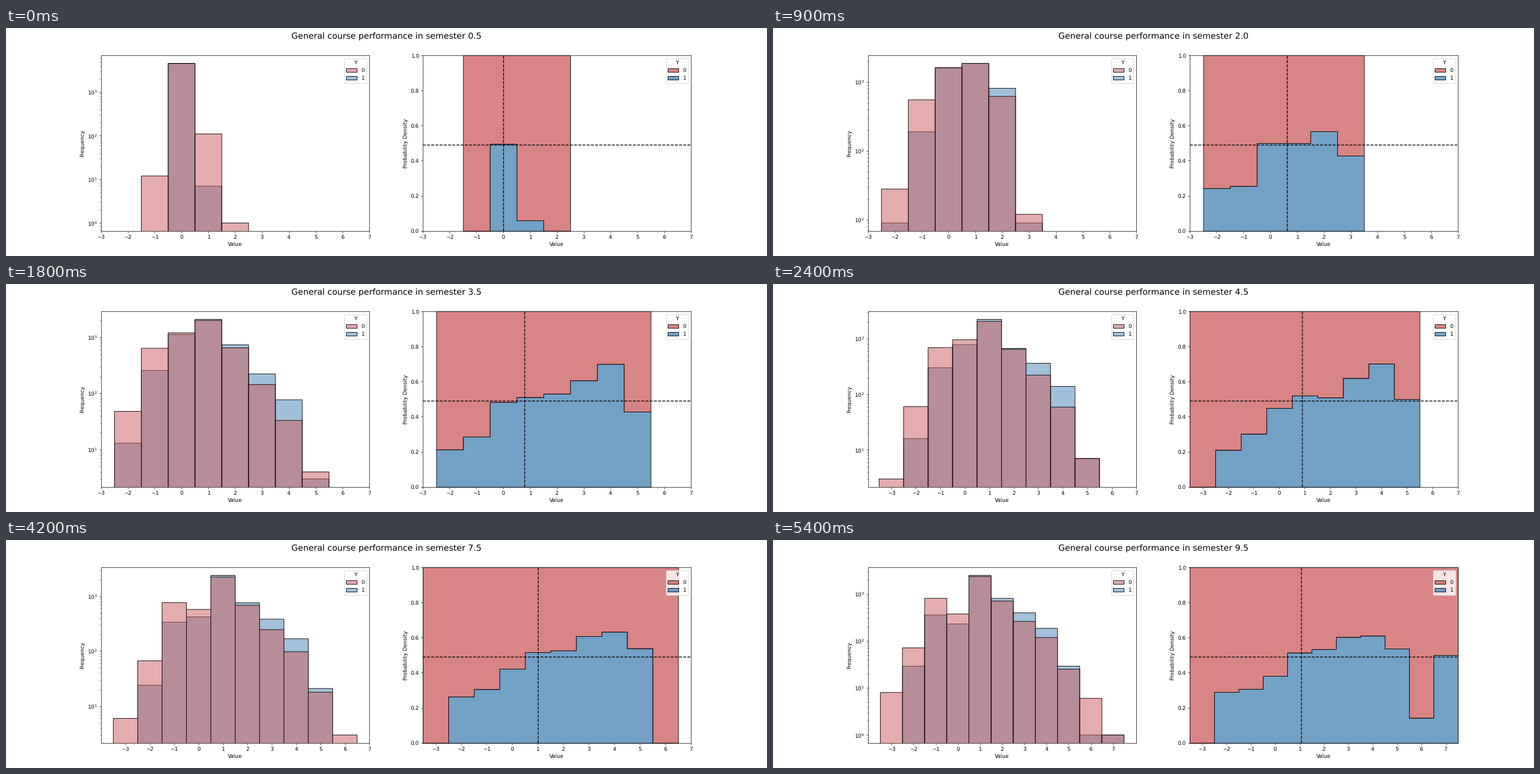
Recreate the animation shown at these times as a matplotlib script. Size 1280 px wide and 384 px high, loop 5700 ms.

```python
import matplotlib.pyplot as plt
import numpy as np
from matplotlib.animation import FuncAnimation
from matplotlib.colors import to_rgba
from matplotlib.patches import Patch

plt.rcParams["text.hinting"] = "none"

COLORS = ("indianred", "steelblue")
STUDENTS = np.array([4710, 4512])
BINS = np.arange(-3, 8)
FRAMES = 19

# Key semesters: first value, then how many of each group have reached it.
# Everybody else is still at zero.
KEYS = {
    0.5: (-1, [12, 0, 110, 1], [0, 0, 7, 0]),
    2.0: (-2, [28, 553, 0, 1875, 622, 12], [9, 190, 0, 1870, 815, 9]),
    3.0: (-2, [35, 569, 0, 1915, 650, 49, 3, 1.2],
          [10, 202, 0, 1900, 812, 51, 2, 0]),
    4.5: (-3, [3, 60, 694, 0, 2060, 645, 222, 59, 7],
          [0, 16, 301, 0, 2235, 669, 362, 139, 7]),
    9.5: (-3, [8, 71, 805, 0, 2340, 703, 260, 118, 25, 6, 1.3],
          [0, 29, 357, 0, 2480, 805, 395, 185, 29, 1, 1.5]),
}


def padded(first, *groups):
    before = first - BINS[0]
    after = len(BINS) - before - len(groups[0])
    return np.pad(np.array(groups, float), ((0, 0), (before, after)))


def results_time(semester):
    """Most results come in at the half semester, few at the full one."""
    return np.floor(semester + .5) + .2 * (semester + .5) % .2


TIMES = [results_time(s) for s in KEYS]
TABLES = [padded(*key) for key in KEYS.values()]


def counts_at(semester):
    now = results_time(semester)
    i = min(np.searchsorted(TIMES, now, side="right"), len(TIMES) - 1)
    start, end = TABLES[i - 1], TABLES[i]
    u = (now - TIMES[i - 1]) / (TIMES[i] - TIMES[i - 1])
    table = start + (end - start) * u ** .7
    if u < .45:
        table[:, start.sum(axis=0) == 0] = 0  # new values wait a while
    table = np.floor(table + 1e-6)
    table[:, BINS == 0] = (STUDENTS - table.sum(axis=1))[:, None]
    return table


def style(color, alpha):
    return dict(facecolor=to_rgba(color, alpha), edgecolor="black",
                linewidth=1, snap=False)


def finish(ax, ylabel, xlim, alpha, loc):
    ax.set_xticks(BINS)
    ax.set_xlim(min(xlim[0], -3), max(xlim[1], 7))
    ax.set_xlabel("Value")
    ax.set_ylabel(ylabel)
    handles = [Patch(**style(c, alpha)) for c in COLORS]
    ax.legend(handles, ["0", "1"], title="Y", loc=loc)


def with_margin(low, high):
    pad = .05 * (high - low)
    return np.array([low - pad, high + pad])


def draw_counts(ax, bins, table):
    ax.set_yscale("log")
    for row, color in zip(table[::-1], COLORS[::-1]):
        seen = row > 0
        ax.bar(bins[seen], row[seen], width=1, **style(color, .5))
    ax.set_ylim(10 ** with_margin(*np.log10([table[table > 0].min(),
                                             table.max()])))
    xlim = with_margin(bins[0] - .5, bins[-1] + .5)
    finish(ax, "Frequency", xlim, .5, "upper right")


def draw_shares(ax, bins, table):
    share = table[1] / table.sum(axis=0)
    share = np.append(share, share[-1])
    edges = np.append(bins, bins[-1] + 1) - .5
    ax.fill_between(edges, 0, share, step="post", **style(COLORS[1], .75))
    ax.fill_between(edges, share, 1, step="post", **style(COLORS[0], .75))
    mean = (table * bins).sum() / table.sum()
    dashed = dict(color="black", linestyle="--", snap=False)
    ax.axhline(STUDENTS[1] / STUDENTS.sum(), **dashed)
    ax.axvline(mean, **dashed)
    ax.set_ylim(0, 1)
    # The legend moves aside while the last column is entirely Y = 1
    loc = "upper left" if share[-1] == 1 else "upper right"
    finish(ax, "Probability Density", (edges[0], edges[-1]), .75, loc)


fig, (left, right) = plt.subplots(1, 2, figsize=(20, 6), dpi=64)
title = fig.suptitle("", fontsize=16)


def update(k):
    semester = (k + 1) / 2
    table = counts_at(semester)
    used = np.flatnonzero(table.sum(axis=0))
    part = slice(used[0], used[-1] + 1)
    for ax, draw in ((left, draw_counts), (right, draw_shares)):
        ax.clear()
        draw(ax, BINS[part], table[:, part])
    title.set_text(f"General course performance in semester {semester}")


anim = FuncAnimation(fig, update, frames=FRAMES, interval=300,
                     init_func=lambda: None, repeat=True, repeat_delay=0)
plt.show()
```
